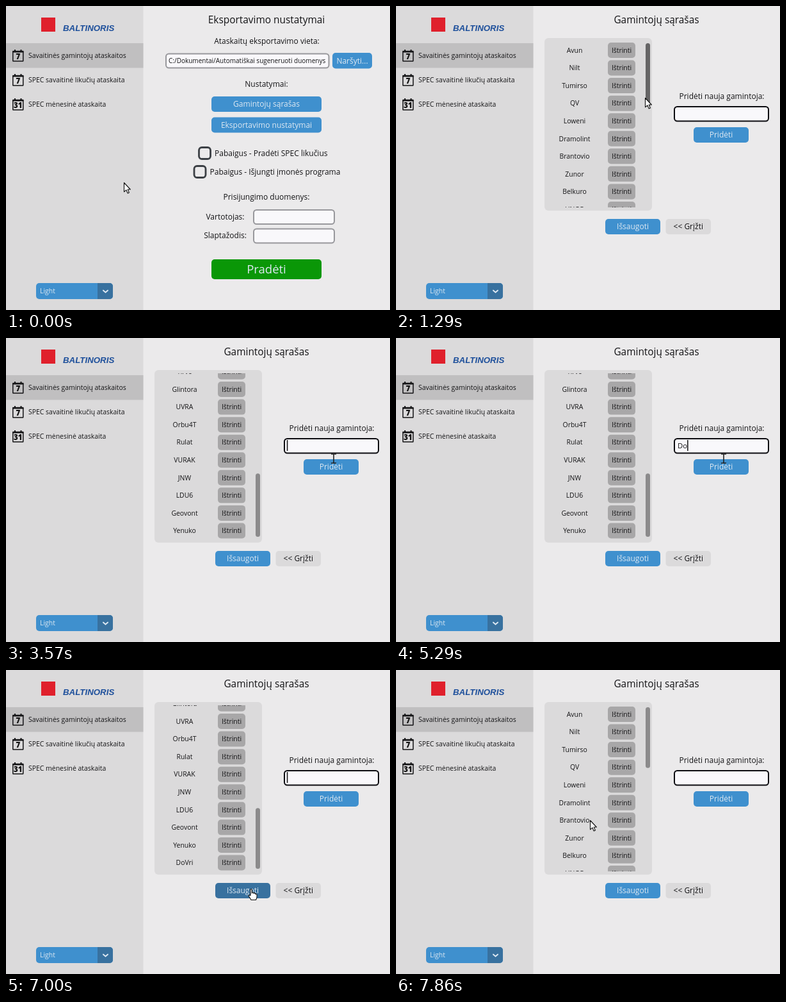
Animation, 600 px wide and 474 px high, one loop 8000 ms. Source, as an HTML page:

```html
<!DOCTYPE html>
<html lang="lt">
<head>
<meta charset="utf-8">
<style>
  html, body { margin: 0; width: 100%; height: 100%; overflow: hidden; background: #ebeaeb; }
  svg { display: block; width: 100%; height: 100%; }
  text { font-family: "Open Sans", "Noto Sans", sans-serif; white-space: pre; }
</style>
</head>
<body>
<svg id="stage" viewBox="0 0 600 474">
  <defs><clipPath id="listClip"><rect x="232" y="55" width="168" height="259"/></clipPath></defs>
</svg>
<script>
const BLUE = '#3f90ce', BLUE_HOVER = '#38719f', PANEL = '#dbdadb', INK = '#141416', PALE = '#dde8f2';
const TITLE = 15.4, BODY = 12, SMALL = 10.45;
const stage = document.getElementById('stage');

function add(parent, tag, attrs = {}, content = '') {
  const el = document.createElementNS('http://www.w3.org/2000/svg', tag);
  for (const key in attrs) el.setAttribute(key, attrs[key]);
  el.textContent = content;
  parent.append(el);
  return el;
}
const group = (parent, attrs) => add(parent, 'g', attrs);
const box = (parent, x, y, width, height, fill, rx = 0, more = {}) =>
  add(parent, 'rect', { x, y, width, height, fill, rx, ...more });
// cy is the middle of the capital letters
const label = (parent, content, x, cy, size = BODY, anchor = 'middle', fill = INK, more = {}) =>
  add(parent, 'text', { x, y: cy + size * 0.36, 'font-size': size, 'text-anchor': anchor, fill, ...more }, content);
function button(parent, content, x, y, w, h, fill = BLUE, size = BODY, ink = PALE) {
  const face = box(parent, x, y, w, h, fill, 5);
  label(parent, content, x + w / 2, y + h / 2, size, 'middle', ink);
  return face;
}
const field = (parent, x, y, w, h, stroke = '#98989c') =>
  box(parent, x + 1, y + 1, w - 2, h - 2, '#f9f8fb', 4.5, { stroke, 'stroke-width': 2 });
const show = (el, on) => el.setAttribute('display', on ? 'inline' : 'none');

// Sidebar
box(stage, 0, 0, 214.5, 474, PANEL);
box(stage, 0, 58, 214.5, 38.5, '#c0bfc0');
box(stage, 55, 18, 22, 22, '#e0202c');
add(stage, 'text', { x: 89, y: 39, fill: '#1d4f9b',
  style: 'font: italic bold 13.3px "Liberation Sans", sans-serif' }, 'BALTINORIS');
[['7', 'Savaitinės gamintojų ataskaitos'], ['7', 'SPEC savaitinė likučių ataskaita'],
 ['31', 'SPEC mėnesinė ataskaita']].forEach(([day, name], i) => {
  const cy = 77 + 38 * i;
  box(stage, 10.8, cy - 6.5, 16, 15.5, 'none', 0.5, { stroke: INK, 'stroke-width': 1.5 });
  add(stage, 'path', { d: `M10 ${cy - 5.5}H27.5M14 ${cy - 9}v4M23.5 ${cy - 9}v4`, stroke: INK, 'stroke-width': 2 });
  label(stage, day, 18.8, cy + 2.2, 11.5, 'middle', '#111', { 'font-weight': 800 });
  label(stage, name, 35, cy, SMALL, 'start');
});
box(stage, 47, 432, 120, 25, BLUE, 5);
add(stage, 'path', { d: 'M143 432h19a5 5 0 0 1 5 5v15a5 5 0 0 1-5 5h-19z', fill: BLUE_HOVER });
add(stage, 'path', { d: 'M152 443.5l3.5 3 3.5-3', fill: 'none', stroke: PALE, 'stroke-width': 2, 'stroke-linecap': 'round' });
label(stage, 'Light', 53, 444.5, SMALL, 'start', PALE);

// Settings page
const settings = group(stage);
label(settings, 'Eksportavimo nustatymai', 407, 21, TITLE);
label(settings, 'Ataskaitų eksportavimo vieta:', 407.5, 55);
field(settings, 249, 73.5, 256.5, 24);
label(settings, 'C:/Dokumentai/Automatiškai sugeneruoti duomenys', 254, 85, 10, 'start');
button(settings, 'Naršyti...', 510, 73, 62, 24.5);
label(settings, 'Nustatymai:', 407, 122);
const makersButton = button(settings, 'Gamintojų sąrašas', 321, 141, 172, 24);
button(settings, 'Eksportavimo nustatymai', 321, 173.5, 172, 24);
[['Pradėti SPEC likučius', 300, 219], ['Išjungti įmonės programa', 292.5, 248]].forEach(([name, x, y]) => {
  box(settings, x + 1.5, y + 1.5, 18, 18, 'none', 4.5, { stroke: '#3c4045', 'stroke-width': 2.8 });
  label(settings, 'Pabaigus - ' + name, x + 26, y + 10.5, BODY, 'start');
});
label(settings, 'Prisijungimo duomenys:', 407, 298);
label(settings, 'Vartotojas:', 342.5, 329);
label(settings, 'Slaptažodis:', 342.5, 358);
field(settings, 386, 317, 128, 24);
field(settings, 386, 346.5, 128, 24);
button(settings, 'Pradėti', 321, 395, 172, 31, '#0a9707', 18.5);

// Manufacturer list page
const ROW = 27.55, VIEW = 259, ADDED = 'DoVri';
const makers = ['Avun', 'Nilt', 'Tumirso', 'QV', 'Loweni', 'Dramolint', 'Brantovio', 'Zunor', 'Belkuro', 'UNOR',
  'Kerulva', 'JTI', 'Orvandel', 'Plumero', 'Tirvo', 'Glintora', 'UVRA', 'Orbu4T', 'Rulat', 'VURAK', 'JNW', 'LDU6',
  'Geovont', 'Yenuko', ADDED];
const list = group(stage);
label(list, 'Gamintojų sąrašas', 407, 21, TITLE);
box(list, 232, 50, 168, 269, PANEL, 6);
const rows = group(group(list, { 'clip-path': 'url(#listClip)' }));
const rowGroups = makers.map((name, i) => {
  const row = group(rows), cy = 69 + ROW * i;
  label(row, name, 279, cy, SMALL);
  button(row, 'Ištrinti', 331, cy - 12, 43, 24, '#a8a7a8', SMALL, INK);
  return row;
});
const thumb = box(list, 390, 58, 7, 99, '#8b8a8b', 3.5);
label(list, 'Pridėti nauja gamintoja:', 509, 141);
field(list, 434, 156, 149, 24.5, '#0c0c10');
const typed = label(list, '', 440, 168, 11.3, 'start');
const caret = box(list, 439, 159, 1.5, 17, '#111');
const addButton = button(list, 'Pridėti', 465, 189, 86, 24);
const saveButton = button(list, 'Išsaugoti', 327, 332, 86, 24);
button(list, '<< Grįžti', 421.5, 332, 70.5, 24, PANEL, BODY, INK);

// Mouse cursors, hotspot at 0,0
const outline = { fill: '#fff', stroke: '#111', 'stroke-width': 1.1, 'stroke-linejoin': 'round' };
const cursors = {
  arrow: add(stage, 'path', { d: 'M.5 .5V14.8L3.8 11.8 6.2 17 8.4 16 6.2 11H10.3Z', ...outline }),
  beam: add(stage, 'path', { d: 'M-4-7H-1Q0-7 0-6Q0-7 1-7H4M0-6V6M-4 7H-1Q0 7 0 6Q0 7 1 7H4',
    fill: 'none', stroke: '#222', 'stroke-width': 1.6 }),
  hand: add(stage, 'path', { d: 'M-1 1Q0-1 1.3 1V6.5Q3 4.5 4 5.8V7Q5.6 5.2 6.6 7V8Q8.6 6.8 9 9V13L7.5 17H0L-3.8 10.8Q-4 8.9-1 10Z',
    ...outline })
};

// Times are in ticks of the 7-per-second screen recording.
const PAGE_OPENS = 7, ROW_ADDED = 43, LIST_RELOADS = 54;
const KEYSTROKES = [33, 35, 39, 40, 41];
// [tick, x, y]: pointer path
const path = [[0, 184, 275], [5, 389, 143], [9, 389, 143], [12, 318, 194], [16, 318, 194],
  [22, 512, 176], [24, 512, 188], [41, 512, 188], [42, 512, 198], [43, 512, 198], [46, 362, 252], [47, 362, 252],
  [49, 383, 341.5], [53, 383, 341.5], [55, 303, 234]];
const within = (t, ...spans) => spans.some(([a, b]) => t >= a && t < b);
const ramp = (t, a, b) => Math.min(1, Math.max(0, (t - a) / (b - a)));

function pointer(t) {
  const i = Math.max(1, path.findIndex(p => p[0] >= t));
  const [a, x0, y0] = path[i - 1], [b, x1, y1] = path[i];
  let k = ramp(t, a, b);
  k = k * k * (3 - 2 * k);
  return [x0 + (x1 - x0) * k, y0 + (y1 - y0) * k];
}

function draw(t) {
  show(settings, t < PAGE_OPENS);
  show(list, t >= PAGE_OPENS);
  makersButton.setAttribute('fill', t >= 4 ? BLUE_HOVER : BLUE);

  // Mouse wheel: down to the end, then one more row once it is added
  const count = t < ROW_ADDED ? 24 : 25, content = count * ROW;
  const scroll = t >= LIST_RELOADS ? 0 : ramp(t, 10, 14) * (24 * ROW - VIEW) + ramp(t, 46, 48) * ROW;
  const length = 252 * VIEW / content;
  rows.setAttribute('transform', `translate(0 ${-scroll})`);
  show(rowGroups[24], count === 25);
  thumb.setAttribute('height', length);
  thumb.setAttribute('y', 58 + scroll / (content - VIEW) * (252 - length));
  thumb.setAttribute('fill', t < 10 ? '#656465' : '#8b8a8b');

  const letters = t >= ROW_ADDED ? 0 : KEYSTROKES.filter(k => t >= k).length;
  typed.textContent = ADDED.slice(0, letters);
  caret.setAttribute('x', 438.8 + (letters ? typed.getComputedTextLength() + 1.2 : 0));
  // The caret blinks 600 ms on, 300 ms off from the moment the field is clicked
  const sinceFocus = t - 23.7;
  show(caret, sinceFocus >= 0 && sinceFocus % 6.3 < 4.2);
  addButton.setAttribute('fill', within(t, [42, 44]) ? BLUE_HOVER : BLUE);
  saveButton.setAttribute('fill', within(t, [49, LIST_RELOADS]) ? BLUE_HOVER : BLUE);

  const kind = within(t, [4, PAGE_OPENS], [42, 44], [49, LIST_RELOADS]) ? 'hand' : within(t, [21, 42]) ? 'beam' : 'arrow';
  for (const name in cursors) show(cursors[name], name === kind);
  const [x, y] = pointer(t);
  cursors[kind].setAttribute('transform', `translate(${x} ${y})`);
}

const TICK = 1000 / 7;
const start = performance.now();
function frame() {
  const ms = (performance.now() - start) % 8000;
  draw(Math.min(55, Math.floor((ms + 6) / TICK)));
  requestAnimationFrame(frame);
}
frame();
</script>
</body>
</html>
```
